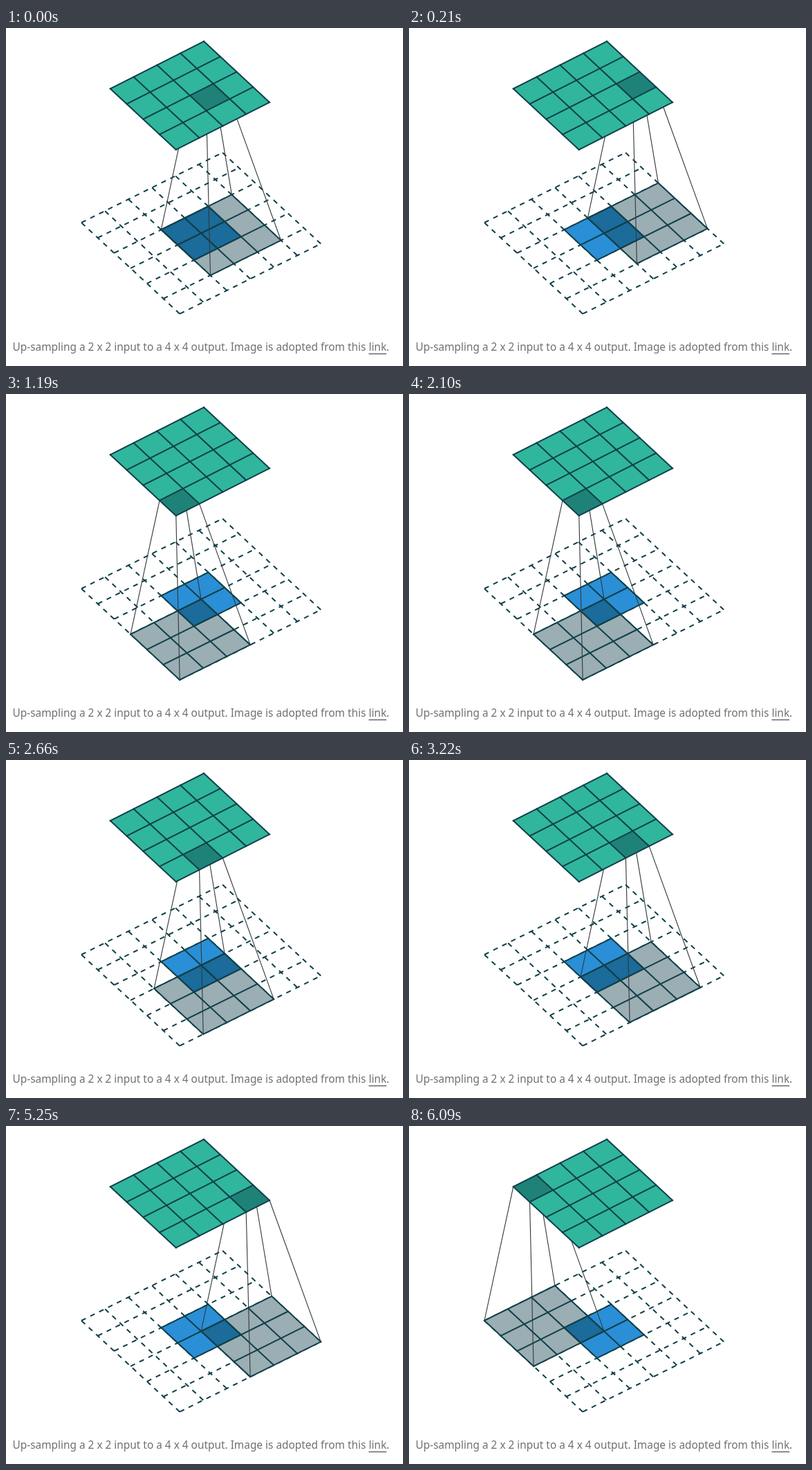
Recreate the animation shown at these times as an HTML page with a canvas. Size 574 by 488 pixels, loop 6160 ms.

```html
<!DOCTYPE html>
<html lang="en">
<head>
<meta charset="utf-8">
<title>Up-sampling by transposed convolution</title>
<style>
  html, body { margin: 0; width: 100%; height: 100%; overflow: hidden; background: #fff; }
  canvas { display: block; }
</style>
</head>
<body>
<canvas id="stage" width="574" height="488"></canvas>
<script>
const ctx = document.getElementById('stage').getContext('2d');

const LOOP = 6160;
const STEP = 1050;
const FIRST_SWITCH = 70;
// Highlighted output cells as [row, column].
const CELLS = [[2, 2], [2, 3], [3, 0], [3, 1], [3, 2], [3, 3], [0, 0]];

const INK = '#10404a';
const SHADE = 'rgba(7, 54, 66, 0.4)';
// One typographic point of the drawing, in pixels.
const PT = 2.39;

// A plane has a left corner, a column vector u and a row vector v.
const input = { x: 109, y: 281, u: [34, -16.85], v: [23.7, 21.95] };
const output = { x: 150.8, y: 87.7, u: [33.8, -17.1], v: [23.75, 22] };

function at(plane, row, col) {
  return [
    plane.x + col * plane.u[0] + row * plane.v[0],
    plane.y + col * plane.u[1] + row * plane.v[1]
  ];
}

function corners(plane, row, col, size) {
  return [[0, 0], [0, size], [size, size], [size, 0]]
    .map(([dr, dc]) => at(plane, row + dr, col + dc));
}

function fillSquare(plane, row, col, size, color) {
  ctx.beginPath();
  corners(plane, row, col, size).forEach(p => ctx.lineTo(...p));
  ctx.closePath();
  ctx.fillStyle = color;
  ctx.fill();
}

function line(a, b) {
  ctx.beginPath();
  ctx.moveTo(...a);
  ctx.lineTo(...b);
  ctx.stroke();
}

// Dashes start at the left edge of rows and the bottom edge of columns.
function drawGrid(plane, row, col, size, dashed) {
  ctx.strokeStyle = INK;
  ctx.lineWidth = 0.85 * PT;
  ctx.lineCap = dashed ? 'butt' : 'square';
  ctx.setLineDash(dashed ? [3 * PT, 3 * PT] : []);
  for (let i = 0; i <= size; i++) {
    line(at(plane, row + i, col), at(plane, row + i, col + size));
    line(at(plane, row + size, col + i), at(plane, row, col + i));
  }
  ctx.setLineDash([]);
}

function drawCaption() {
  const left = 9.5, baseline = 466;
  const lead = 'Up-sampling a 2 x 2 input to a 4 x 4 output. Image is adopted from this ';
  ctx.font = '15.4px "Noto Sans", "Open Sans", sans-serif';
  ctx.fillStyle = '#707070';
  ctx.fillText(lead + 'link.', left, baseline);
  ctx.fillStyle = '#333';
  ctx.fillRect(left + ctx.measureText(lead).width, 470, ctx.measureText('link').width, 1);
}

function draw(time) {
  const step = time < FIRST_SWITCH ? 0 : 1 + Math.floor((time - FIRST_SWITCH) / STEP);
  const [row, col] = CELLS[Math.min(step, CELLS.length - 1)];

  ctx.fillStyle = '#fff';
  ctx.fillRect(0, 0, 574, 488);

  drawGrid(input, 0, 0, 6, true);
  fillSquare(input, row, col, 3, '#fff');
  fillSquare(input, 2, 2, 2, '#2a8fd7');
  fillSquare(input, row, col, 3, SHADE);
  drawGrid(input, 2, 2, 2);
  drawGrid(input, row, col, 3);

  ctx.strokeStyle = '#343a3c';
  ctx.lineWidth = 0.47 * PT;
  const ends = corners(output, row, col, 1);
  corners(input, row, col, 3).forEach((p, i) => line(p, ends[i]));

  fillSquare(output, 0, 0, 4, '#30b69d');
  fillSquare(output, row, col, 1, SHADE);
  drawGrid(output, 0, 0, 4);

  drawCaption();
}

const start = performance.now();
function tick() {
  draw((performance.now() - start) % LOOP);
  requestAnimationFrame(tick);
}
tick();
</script>
</body>
</html>
```
